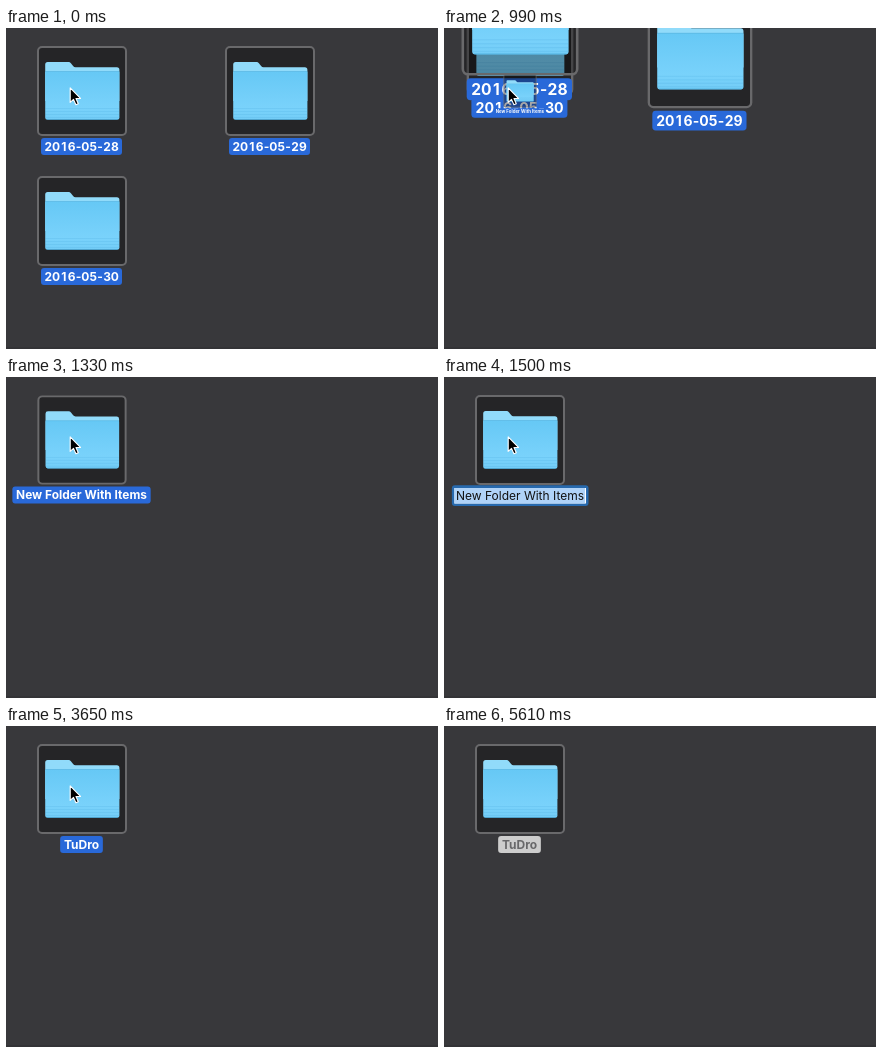
Write an HTML page with a canvas that moves like this. It is 432 px wide and 321 px high and loops after 5710 ms.

```html
<!DOCTYPE html>
<html lang="en">
<head>
<meta charset="utf-8">
<title>New folder with selection</title>
<style>
  html, body { margin: 0; width: 100%; height: 100%; overflow: hidden; background: #38383b; }
  canvas { display: block; width: 432px; height: 321px; }
</style>
</head>
<body>
<canvas id="stage" width="432" height="321"></canvas>
<script>
const ctx = document.getElementById('stage').getContext('2d');
const LOOP = 5710;
const FONT = 'Inter, "Open Sans", sans-serif';
const BLUE = '#2969d9';
const NAME = 'TuDro';
const DRAFT = 'New Folder With Items';
const HOME = { x: 76, y: 63, s: 1 };

const LIFT_OFF = 810;  // selection starts to fly
const TICK = 86.6;     // the flight advances in steps
const EDIT = 1410;     // name field opens
const KEYSTROKES = [2490, 2760, 3120, 3200, 3380];
const COMMIT = 3560;
const DESELECT = 5610;

// Back to front; "hop" sets how high the arc rises.
const FLIGHTS = [
  { text: '2016-05-30', x: 76, y: 193, start: 734, span: 500, hop: 430 },
  { text: '2016-05-28', x: 76, y: 63, start: 771, span: 560, hop: 343 },
  { text: '2016-05-29', x: 264, y: 63, start: 885, span: 480, hop: 390 }
];

const clamp = v => Math.min(1, Math.max(0, v));
const ease = v => (1 - Math.cos(Math.PI * clamp(v))) / 2;

// Hop up and grow, then drop into the new folder and shrink away.
function flightPose({ x, y, start, span, hop }, t) {
  const p = ease((t - start) / span);
  const travel = Math.sin(p * Math.PI / 2) ** 1.7;
  return {
    x: x + (HOME.x - x) * travel,
    y: y + (HOME.y - y) * travel - hop * p * (1 - p),
    s: 1 + 1.95 * p - 3.17 * p * p
  };
}

function fillRounded(x, y, w, h, r, color) {
  ctx.beginPath();
  ctx.roundRect(x, y, w, h, r);
  ctx.fillStyle = color;
  ctx.fill();
}

function folder() {
  const left = -36.8, right = 37.4, w = right - left;

  // Back with tab
  ctx.beginPath();
  ctx.moveTo(left, 10);
  ctx.arcTo(left, -29, -12, -29, 2.5);
  ctx.arcTo(-12, -29, -8, -23.8, 3);
  ctx.arcTo(-8, -23.8, right, -23.8, 3);
  ctx.arcTo(right, -23.8, right, 10, 2.5);
  ctx.lineTo(right, 10);
  ctx.fillStyle = '#91dbfa';
  ctx.fill();

  // Front panel
  const shade = ctx.createLinearGradient(0, -20, 0, 29);
  shade.addColorStop(0, '#66c8f5');
  shade.addColorStop(0.75, '#79d2fb');
  shade.addColorStop(1, '#73cdf7');
  fillRounded(left, -19.5, w, 48.3, [1, 1, 2.5, 2.5], shade);
  ctx.fillStyle = 'rgba(60,160,210,0.4)';
  ctx.fillRect(left, -20, w, 1);
  ctx.fillStyle = 'rgba(50,150,205,0.14)';
  for (let y = 17; y < 27; y += 3) ctx.fillRect(left, y, w, 1);
  ctx.fillStyle = 'rgba(60,160,210,0.6)';
  ctx.fillRect(left + 1.5, 28, w - 3, 0.8);
}

function icon() {
  fillRounded(-44, -44, 88, 88, 4, 'rgba(0,0,0,0.34)');
  ctx.strokeStyle = '#69696b';
  ctx.lineWidth = 2;
  ctx.stroke();
  folder();
}

// Dates use equal-width digit cells.
function dateText(text) {
  const cell = c => c === '-' ? 6 : 7.8;
  let x = -37.7;
  for (const c of text) {
    ctx.fillText(c, x + cell(c) / 2, 60);
    x += cell(c);
  }
}

function label(text, back, color) {
  ctx.font = '700 12px ' + FONT;
  ctx.textAlign = 'center';
  const isDate = /^\d/.test(text);
  const w = isDate ? 81 : ctx.measureText(text).width + 7.5;
  fillRounded(-0.5 - w / 2, 47, w, 17, 3, back);
  ctx.fillStyle = color;
  if (isDate) dateText(text);
  else ctx.fillText(text, -0.5, 60);
}

function field(text, selected, glow) {
  ctx.font = '400 12px ' + FONT;
  ctx.textAlign = 'center';
  const w = ctx.measureText(text).width + 8.5, left = 0.2 - w / 2;
  if (glow) fillRounded(left - 3, 42, w + 6, 27, 6, 'rgba(42,110,180,0.4)');
  fillRounded(left, 45.3, w, 20.7, 3, '#2769ad');
  ctx.fillStyle = '#fff';
  ctx.fillRect(left + 2.5, 48, w - 5, 15.5);
  if (selected) {
    ctx.fillStyle = '#b0d3f8';
    ctx.fillRect(left + 2.5, 48, w - 6, 15.5);
  }
  ctx.fillStyle = '#111';
  ctx.fillText(text, 0, 60);
}

function place({ x, y, s }, draw, alpha = 1) {
  if (s <= 0) return;
  ctx.save();
  ctx.translate(x, y);
  ctx.scale(s, s);
  ctx.globalAlpha = alpha;
  draw();
  ctx.restore();
}

function item(pose, text, alpha) {
  place(pose, () => { icon(); label(text, BLUE, '#fff'); }, alpha);
}

function flight(t) {
  const step = Math.floor((t - LIFT_OFF) / TICK);
  const tick = step < 0 ? 0 : LIFT_OFF + step * TICK;
  for (const f of FLIGHTS) item(flightPose(f, tick), f.text);
  if (step < 0) return;
  const age = tick - LIFT_OFF;
  item({ ...HOME, s: 0.18 + 0.82 * ease((age + 4) / 560) }, DRAFT, clamp(0.1 + age / 190));
}

function nameTag(t) {
  const typed = KEYSTROKES.filter(k => k <= t).length;
  if (t < COMMIT) {
    if (typed) field(NAME.slice(0, typed));
    else field(DRAFT, true, t < EDIT + 90);
  } else if (t < COMMIT + 90 || t >= DESELECT) {
    label(NAME, '#cdcdcd', '#68686a');
  } else {
    label(NAME, BLUE, '#fff');
  }
}

function cursor(x, y) {
  ctx.save();
  ctx.translate(x, y);
  const arrow = new Path2D('M0 0V14.6L3.3 11.6L5.7 17L8.1 16L5.8 10.7L10.3 10.6Z');
  ctx.lineJoin = 'round';
  ctx.fillStyle = '#000';
  ctx.strokeStyle = '#fff';
  ctx.lineWidth = 1.1;
  ctx.fill(arrow);
  ctx.stroke(arrow);
  ctx.restore();
}

function render(t) {
  ctx.fillStyle = '#38383b';
  ctx.fillRect(0, 0, 432, 321);
  ctx.fillStyle = '#333336';
  ctx.fillRect(0, 319, 432, 2);
  if (t < EDIT) flight(t);
  else place(HOME, () => { icon(); nameTag(t); });
  if (t < 4450) cursor(64.2, 59.8);
  else if (t < 4540) cursor(28.8, 61);
}

function loop() {
  render(performance.now() % LOOP);
  requestAnimationFrame(loop);
}
loop();
</script>
</body>
</html>
```
